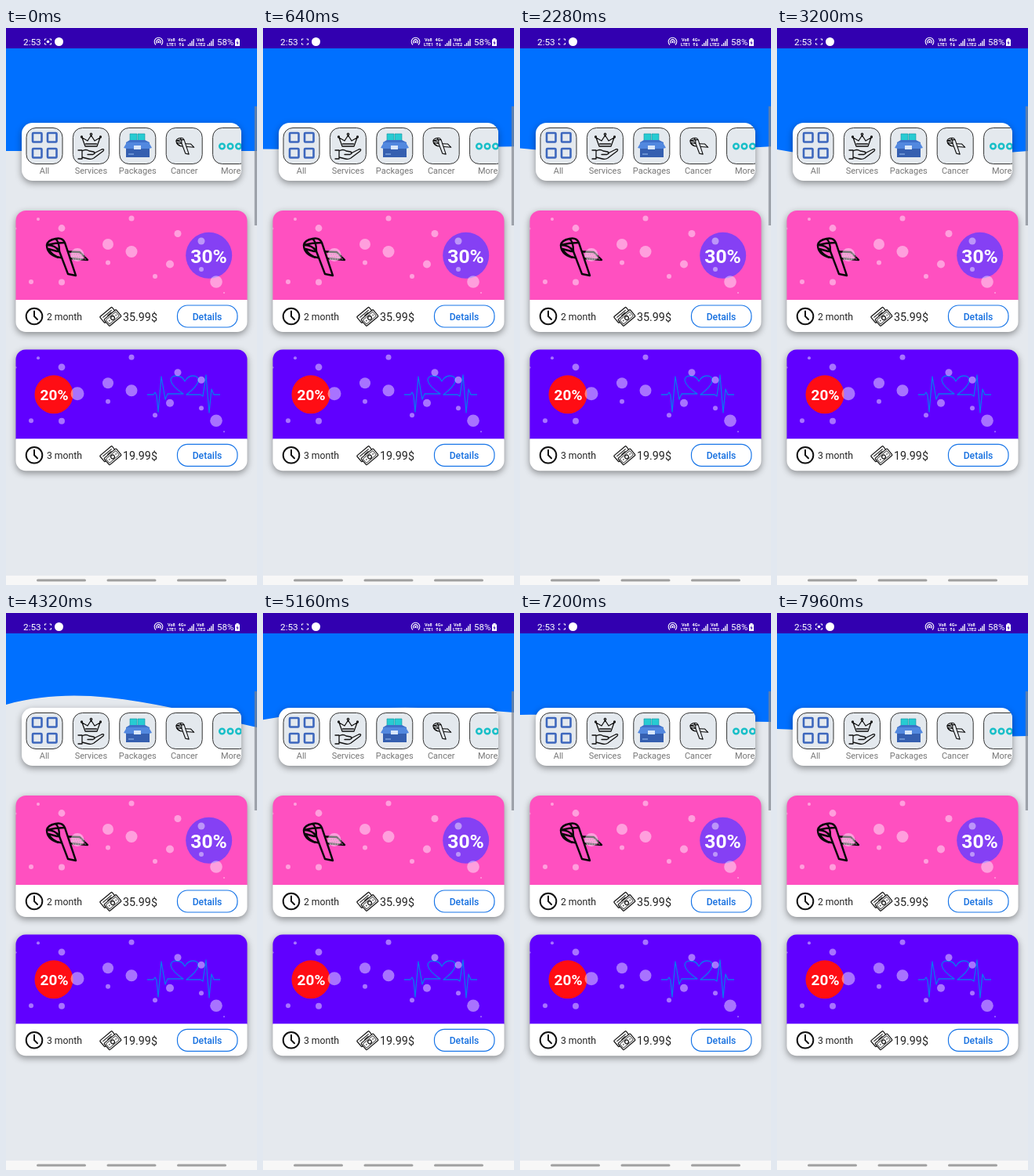
These frames come from a looping animation (320x711 px, 8000 ms). An HTML page:

```html
<!DOCTYPE html>
<html lang="en">
<head>
<meta charset="utf-8">
<style>
  html, body { margin: 0; width: 100%; height: 100%; overflow: hidden; background: #e5e9ee; }
  svg { display: block; width: 100%; height: 100%; }
  text { font-family: Roboto, sans-serif; }
  .card { filter: drop-shadow(0 3px 4px #0006); }
  .line { fill: none; stroke: #111; stroke-linecap: round; stroke-linejoin: round; }
  .label { font-size: 11px; fill: #777; text-anchor: middle; }
  .tile { fill: #e4e9ee; stroke: #333; }
  .tiny { font-size: 5.5px; font-weight: 700; }
</style>
</head>
<body>
<svg viewBox="0 0 320 711" preserveAspectRatio="none">
  <defs>
    <clipPath id="menuClip"><rect x="20" y="121" width="280" height="74" rx="14"/></clipPath>
    <clipPath id="cardClip"><rect x="12.5" y="233" width="295" height="155" rx="13"/></clipPath>

    <!-- Ribbon: currentColor is the colour inside the bands -->
    <g id="ribbon" fill="currentColor" stroke="#080808" stroke-width="2.4" stroke-linejoin="round">
      <path d="M14 17L43 18 53 28 18 25Q8 23 3 14Z"/>
      <path d="M1 9Q2 3 12 1Q21 -1 24 6L38 48 28 46 17 17Q12 9 1 9Z"/>
      <path d="M1 9Q1 21 16 25M1 9Q12 6 24 6M12 1Q17 4 17 17" fill="none"/>
    </g>

    <g id="cash" class="line" stroke-width="1.2">
      <g transform="rotate(-40 133 368)">
        <rect x="122" y="360" width="20" height="10" rx="1" fill="#fff"/>
        <rect x="124" y="366" width="20" height="11" rx="1" fill="#fff"/>
        <rect x="126" y="368" width="16" height="7" stroke-width=".8"/>
        <circle cx="134" cy="371.5" r="2.4"/>
        <path d="M128 371.5h1M139 371.5h1M125 363h14M131 365h6" stroke-width="1"/>
      </g>
    </g>

    <g id="footer">
      <rect x="12" y="347" width="296" height="42" fill="#fff"/>
      <g class="line" stroke-width="2">
        <circle cx="36" cy="368" r="10.3"/>
        <path d="M36 361.5V368l4 4"/>
      </g>
      <use href="#cash"/>
      <rect x="218.5" y="354" width="76.5" height="28" rx="13" fill="none" stroke="#1976e8" stroke-width="1.2"/>
      <text x="256.5" y="372.5" font-size="12.2" font-weight="500" text-anchor="middle" fill="#1670e0">Details</text>
    </g>

    <g id="bubbles" fill="#fff" fill-opacity=".45"></g>
  </defs>

  <rect width="320" height="711" fill="#e5e9ee"/>
  <path id="wave" fill="#0070ff"/>
  <rect width="320" height="26" fill="#3200b0"/>

  <g fill="#fff">
    <text x="22" y="22" font-size="11.8">2:53</text>
    <path d="M49.5 16v-2h2M55.5 14h2v2M57.5 19v2h-2M51.5 21h-2v-2" fill="none" stroke="#fff"/>
    <circle id="recording" cx="53.5" cy="17.5" r="1.8"/>
    <circle cx="67.5" cy="17.5" r="5.5"/>
    <g fill="none" stroke="#fff" stroke-width="1.1">
      <path d="M191 21.5A5.3 5.3 0 1 1 198 21.5M192.5 19.5A2.8 2.8 0 1 1 196.5 19.5"/>
    </g>
    <circle cx="194.5" cy="17.8" r="1.3"/>
    <g class="tiny">
      <text x="206" y="17">Vo8</text><text x="205" y="23">LTE1</text>
      <text id="network" x="219.5" y="17">4G+</text>
      <text x="243" y="17">Vo8</text><text x="242" y="23">LTE2</text>
    </g>
    <path d="M222 23v-4M220.7 20.5l1.3-1.5 1.3 1.5M225.5 19v4M224.2 21.5l1.3 1.5 1.3-1.5" fill="none" stroke="#fff" stroke-width=".9"/>
    <path id="bars" d="M232.5 23v-2M234.7 23v-4M236.9 23v-6.5M239.1 23v-9" stroke="#fff" stroke-width="1.3"/>
    <use href="#bars" x="25"/>
    <text x="269" y="22" font-size="11.5">58%</text>
    <path d="M292 14.5h1.5V13h3v1.5H298V23h-6z"/>
    <path d="M295.5 15.5l-2 4h1.5l-.5 2.7 2.2-3.8h-1.6z" fill="#3200b0"/>
  </g>

  <g class="card">
    <rect x="20" y="121" width="280" height="74" rx="14" fill="#fff"/>
    <g clip-path="url(#menuClip)">
      <g id="tiles"></g>
      <g fill="none" stroke="#3d67bd" stroke-width="2.6">
        <rect x="34" y="134" width="11.5" height="11.5" rx="1"/><rect x="53" y="134" width="11.5" height="11.5" rx="1"/>
        <rect x="34" y="154" width="11.5" height="11.5" rx="1"/><rect x="53" y="154" width="11.5" height="11.5" rx="1"/>
      </g>
      <g class="line" stroke-width="1.3">
        <path d="M101 151L97 140l7 4 4.5-7 4.5 7 7-4-4 11zM101.5 148h14"/>
        <circle cx="108.5" cy="135.5" r="1.2"/><circle cx="96.5" cy="139" r="1"/><circle cx="120.5" cy="139" r="1"/>
        <path d="M92 156h5v11h-5M97 157q5-3 9 0l6 1q3 2-1 3.500h-7M112 160l10-5q4-1 2 2l-12 9q-3 2-7 1l-8-2"/>
      </g>
      <g>
        <path d="M158 135h9v12h-9zM168 135h9v12h-9z" fill="#27cbd2" stroke="#18929e" stroke-width=".6"/>
        <path d="M153 146l5-3h19l6 3v19h-30z" fill="#3e70c8"/>
        <path d="M150 153l4-7h28l4 7-4 1h-28z" fill="#5288df"/>
        <path d="M153 154h30v11h-30z" fill="#355fb0"/>
        <path d="M163 150h9v5h-9z" fill="#d8e7fa"/>
        <path d="M156 161h7" stroke="#9cc2f3"/>
      </g>
      <use href="#ribbon" transform="translate(216.5 140) scale(.44)" color="#e4e9ee"/>
      <g fill="none" stroke="#19bfc8" stroke-width="2.5">
        <circle cx="275.5" cy="151" r="3.3"/><circle cx="286" cy="151" r="3.3"/><circle cx="296.500" cy="151" r="3.3"/>
      </g>
    </g>
  </g>

  <g class="card">
    <g clip-path="url(#cardClip)">
      <rect x="12" y="233" width="296" height="115" fill="#ff50c0"/>
      <use href="#ribbon" x="51" y="268" color="#ff50c0"/>
      <path d="M83 289h17M84 292h18M85 295h18" stroke="#8c7186" stroke-width="1.2" stroke-dasharray="2 1"/>
      <circle cx="258.7" cy="290.300" r="29.500" fill="#8540f4"/>
      <use href="#bubbles"/>
      <text x="258.5" y="299.5" font-size="24.7" font-weight="700" text-anchor="middle" fill="#fff">30%</text>
      <use href="#footer"/>
      <text x="52" y="372.500" font-size="12.2" fill="#222">2 month</text>
      <text x="149" y="373.500" font-size="14.3" fill="#222">35.99$</text>
    </g>
  </g>

  <g class="card" transform="translate(0 177.300)">
    <g clip-path="url(#cardClip)">
      <rect x="12" y="233" width="296" height="115" fill="#6000ff"/>
      <circle cx="61" cy="290.500" r="24.500" fill="#ff0d14"/>
      <path transform="translate(0 -177.3)" fill="none" stroke="#0878f0" stroke-width="1.3" stroke-linejoin="round"
        d="M180 468H188L190 465 192 469 194 490 198 445 203 474 206 467H226C205 453 208 444 217 444Q225 444 228 451Q232 444 238 444C248 444 250 453 230 468H248L251 470 255 443 259 491 262 461 265 468H273"/>
      <use href="#bubbles"/>
      <text x="61.5" y="297.500" font-size="19" font-weight="700" text-anchor="middle" fill="#fff">20%</text>
      <use href="#footer"/>
      <text x="52" y="372.500" font-size="12.2" fill="#222">3 month</text>
      <text x="149" y="373.500" font-size="14.3" fill="#222">19.99$</text>
    </g>
  </g>

  <rect x="316.8" y="100" width="3.2" height="152" fill="#7f858d" opacity=".7"/>
  <rect y="699" width="320" height="12" fill="#f7f7f7"/>
  <path d="M40.500 705h60M130 705h60M219.500 705h60" stroke="#a0a0a0" stroke-width="3" stroke-linecap="round"/>
</svg>

<script>
const byId = id => document.getElementById(id);

byId('tiles').innerHTML = ['All', 'Services', 'Packages', 'Cancer', 'More'].map((name, i) => {
  const x = 49 + i * 59.4;
  return `<rect class="tile" x="${x - 23}" y="127.500" width="46" height="46" rx="12"/>
    <text class="label" x="${x}" y="186">${name}</text>`;
}).join('');

// Bubbles as x, y, radius
byId('bubbles').innerHTML = [
  [41, 244, 2], [160, 243, 3.5], [71, 255.5, 4.4], [219, 262.5, 4.5], [249, 272, 4.5],
  [130, 276, 7], [160, 285.5, 7.5], [91, 289.5, 8.5], [130, 299.5, 3], [209, 301.5, 5],
  [249, 308, 3], [190, 317, 3], [32, 324, 3], [71, 324.5, 4], [268, 324, 7.8],
  [278, 338, 1], [12, 256, 1.5]
].map(([x, y, r]) => `<circle cx="${x}" cy="${y}" r="${r}"/>`).join('');

// Wave poses: time, then heights of a cubic's left end, two handles and right end
const poses = [
  [0, 157, 157, 157, 157],
  [1320, 152, 155, 148, 145],
  [3200, 155, 175, 165, 157],
  [4320, 117, 87, 123, 146],
  [6080, 158, 150, 120, 113],
  [7200, 130, 128, 139, 139],
  [7960, 148, 152, 160, 157]
];

function slope(i, k) {
  const before = poses[i - 1], here = poses[i], after = poses[i + 1];
  if (!before || !after) return 0;
  // Level off at turning points so the edge never overshoots
  if ((here[k] - before[k]) * (after[k] - here[k]) <= 0) return 0;
  return (after[k] - before[k]) / (after[0] - before[0]);
}

function waveHeight(time, k) {
  const last = poses.length - 1;
  if (time >= poses[last][0]) return poses[last][k];
  const i = poses.findIndex(p => p[0] > time) - 1;
  const a = poses[i], b = poses[i + 1], span = b[0] - a[0], u = (time - a[0]) / span;
  const ease = u * u * (3 - 2 * u);
  return a[k] + (b[k] - a[k]) * ease
    + span * u * (1 - u) * ((1 - u) * slope(i, k) - u * slope(i + 1, k));
}

function draw(now) {
  const time = now % 8000;
  const [left, c1, c2, right] = [1, 2, 3, 4].map(k => waveHeight(time, k));
  byId('wave').setAttribute('d', `M0 20V${left}C106.7 ${c1} 213.3 ${c2} 320 ${right}V20Z`);
  byId('recording').setAttribute('opacity', (time + 600) % 2000 < 880 ? 1 : 0);
  byId('network').textContent = time > 5600 && time < 6600 ? '4G' : '4G+';
}

const start = performance.now();
function tick() {
  draw(performance.now() - start);
  requestAnimationFrame(tick);
}
tick();
</script>
</body>
</html>
```
